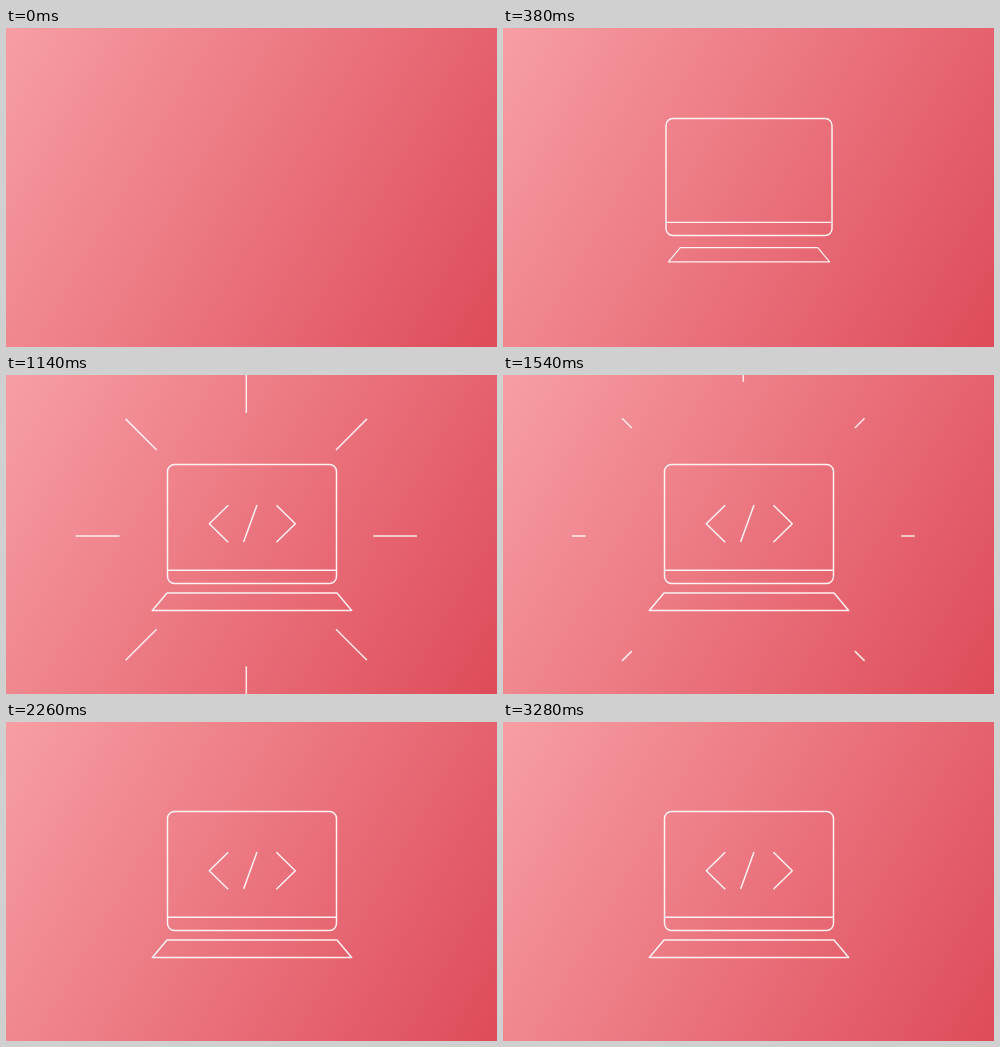
Write an HTML page that moves like this. It is 491 by 319 pixels and loops after 3300 ms.

```html
<!DOCTYPE html>
<html lang="en">
<head>
<meta charset="utf-8">
<title>Laptop</title>
<style>
  html, body { margin: 0; width: 100%; height: 100%; overflow: hidden; }
  body { background: linear-gradient(120deg, #f79ea4, #de4b59); }
  svg { display: block; width: 491px; height: 319px; }
  svg * { fill: none; stroke: #fff; stroke-width: 1.5; stroke-linejoin: round; }
</style>
</head>
<body>
<svg viewBox="0 0 491 319">
  <g id="rays" stroke-opacity=".85"></g>
  <g id="screen" stroke-opacity=".9">
    <rect x="161.5" y="89.5" width="169" height="119" rx="7"/>
    <path d="M161.5 195.2H330.5"/>
  </g>
  <path id="keyboard" stroke-opacity=".9" d="M161 218H331L345.7 235.5H146.3Z"/>
  <path id="slash" stroke-opacity=".9" d="M251 130L237.6 167"/>
  <path id="left" stroke-opacity=".9" d="M222.2 130.2L203.3 148.8L222.2 167.2"/>
  <path id="right" stroke-opacity=".9" d="M270.4 130.2L289.3 148.8L270.4 167.2"/>
</svg>
<script>
const LOOP = 3300, STEP = 380, RAYS = 8;
const el = id => document.getElementById(id);
const clamp = v => Math.min(1, Math.max(0, v));
const progress = (t, start, length) => clamp((t - start) / length);
const easeOut = p => 1 - (1 - p) ** 3;

const rays = Array.from({ length: RAYS }, () =>
  el('rays').appendChild(document.createElementNS('http://www.w3.org/2000/svg', 'path')));

function show(node, visible) {
  node.setAttribute('visibility', visible ? 'visible' : 'hidden');
}

function grow(id, t, start, x, y) {
  const s = easeOut(progress(t, start, STEP));
  show(el(id), s > 0);
  el(id).setAttribute('transform', `translate(${x} ${y}) scale(${s}) translate(${-x} ${-y})`);
}

function slide(id, t, direction) {
  const p = easeOut(progress(t, 690, STEP));
  el(id).setAttribute('transform', `translate(${direction * 40 * (1 - p)} 0)`);
  el(id).setAttribute('opacity', p);
}

function drawRays(t) {
  const distance = 166.5 - 57 * (1 - progress(t, 780, 1120)) ** 3;
  const half = 22 * easeOut(progress(t, 780, 360)) * (1 - progress(t, 1140, 810)) ** 1.7;
  rays.forEach((ray, i) => {
    const angle = i * 2 * Math.PI / RAYS;
    const cy = i % 4 ? 164.6 : 161; // the horizontal pair sits a little higher
    const point = r => `${240.3 + r * Math.cos(angle)} ${cy + r * Math.sin(angle)}`;
    show(ray, half > 0.1);
    ray.setAttribute('d', `M${point(distance - half)}L${point(distance + half)}`);
  });
}

function render(t) {
  grow('screen', t, 100, 246, 149);
  grow('keyboard', t, 220, 246, 226.7);
  grow('slash', t, 540, 244.3, 148.5);
  slide('left', t, -1);
  slide('right', t, 1);
  drawRays(t);
}

const origin = performance.now();
function tick() {
  render((performance.now() - origin) % LOOP);
  requestAnimationFrame(tick);
}
tick();
</script>
</body>
</html>
```
